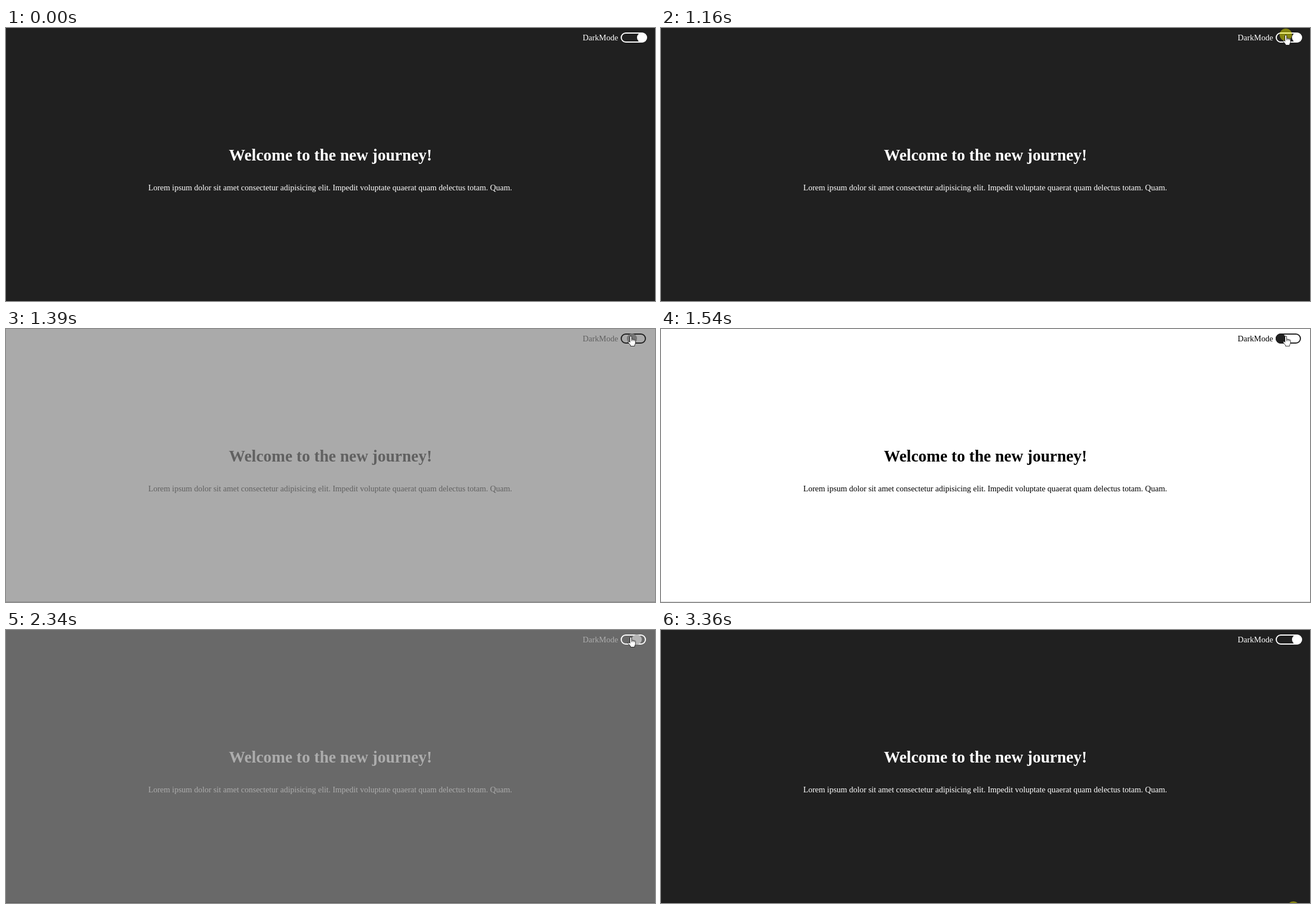
These frames come from a looping animation (1153 px wide and 486 px high, 3490 ms). An HTML page:

```html
<!DOCTYPE html>
<html lang="en">
<head>
<meta charset="utf-8">
<title>Dark mode switch</title>
<style>
  html, body { margin: 0; width: 100%; height: 100%; overflow: hidden; background: #202020; }
  svg { display: block; }
  text { font: 14.5px "Liberation Serif", "Times New Roman", serif; }
  .title { font-size: 29px; font-weight: bold; }
  .cursor { fill: #fff; stroke: #000; stroke-width: .8; stroke-linejoin: round; }
</style>
</head>
<body>
<svg width="1153" height="486" viewBox="0 0 1153 486">
  <rect id="page" width="1153" height="486"/>
  <rect y="485" width="1153" height="1" opacity=".16"/>
  <g id="words">
    <text x="1024.5" y="22">DarkMode</text>
    <text class="title" x="576.5" y="236" text-anchor="middle">Welcome to the new journey!</text>
    <text x="576" y="289" text-anchor="middle">Lorem ipsum dolor sit amet consectetur adipisicing elit. Impedit voluptate quaerat quam delectus totam. Quam.</text>
  </g>
  <rect id="track" x="1093" y="9" width="43" height="16" rx="8" fill="none" stroke-width="2"/>
  <circle id="knob" cy="17" r="9"/>
  <circle id="press" r="11" fill="#ff0" opacity=".45"/>
  <path id="arrow" class="cursor" d="M0 0V15L3.5 11.8 6 17.5 8.3 16.5 5.8 11H10.6Z"/>
  <path id="hand" class="cursor" d="M-1.5 1.5a1.5 1.5 0 0 1 3 0V6q1.2-1 2.5 .2 1.5-.8 2.4 .5 1.6-.4 1.9 1.2V12q0 2-1.5 4V18H-.5V16.5L-4.6 11.5q-.8-1.6 .6-2 1-.2 2.5 1.6ZM1.5 6V9M4 6.5V9M6.4 7V9"/>
</svg>
<script>
const LOOP = 3490, FADE = 335;
// The screen refreshes only at these moments (ms).
const ticks = [0, 300, 370, 440, 520, 690, 760, 840, 1160, 1230, 1310, 1390, 1460, 1540,
  2020, 2090, 2170, 2260, 2340, 2410, 2510, 2570, 2640, 2720, 2800, 2870, 2950, 3030, 3110, 3360];
// Pointer: time, shape, tip x, tip y.
const pointer = [
  [0, ""],
  [300, "arrow", 1084, 465], [370, "arrow", 1085, 245], [440, "arrow", 1086, 16], [520, ""],
  [690, "hand", 1102, -6], [760, "hand", 1107, 6], [840, "hand", 1110, 12.5],
  [2510, "arrow", 1100, 26], [2570, "arrow", 1092, 80], [2640, "arrow", 1083, 155],
  [2720, "arrow", 1078, 235], [2800, "arrow", 1081, 310], [2870, "arrow", 1089, 380],
  [2950, "arrow", 1100, 445], [3030, "arrow", 1111, 483], [3110, ""]
];
// Mouse presses: start, end, x, y.
const presses = [[1160, 1230, 1110, 12], [2020, 2090, 1110, 12], [3360, LOOP, 1123.5, 494]];

const el = id => document.getElementById(id);
const show = (id, on) => el(id).setAttribute("visibility", on ? "visible" : "hidden");
const place = (id, x, y) => el(id).setAttribute("transform", `translate(${x} ${y})`);
const ramp = (t, start) => Math.min(1, Math.max(0, (t - start) / FADE));
const mix = (a, b, k) => a + (b - a) * k;
const gray = (a, b, k) => { const v = Math.round(mix(a, b, k)); return `rgb(${v},${v},${v})`; };

function draw(time) {
  const t = ticks.findLast(s => s <= time);
  const light = ramp(t, 1183) - ramp(t, 2114);
  el("page").setAttribute("fill", gray(32, 255, light));
  el("words").setAttribute("fill", gray(255, 0, light));
  el("track").setAttribute("stroke", t >= 1230 && t < 2090 ? "#202020" : "#fff");
  el("knob").setAttribute("fill", gray(255, 32, light));
  el("knob").setAttribute("cx", mix(1130, 1101, light));

  const [, shape, x, y] = pointer.findLast(p => p[0] <= t);
  for (const id of ["arrow", "hand"]) show(id, id === shape);
  if (shape) place(shape, x, y);

  const press = presses.find(p => t >= p[0] && t < p[1]);
  show("press", press);
  if (press) place("press", press[2], press[3]);
}

const begin = performance.now();
function loop() {
  draw((performance.now() - begin) % LOOP);
  requestAnimationFrame(loop);
}
loop();
</script>
</body>
</html>
```
